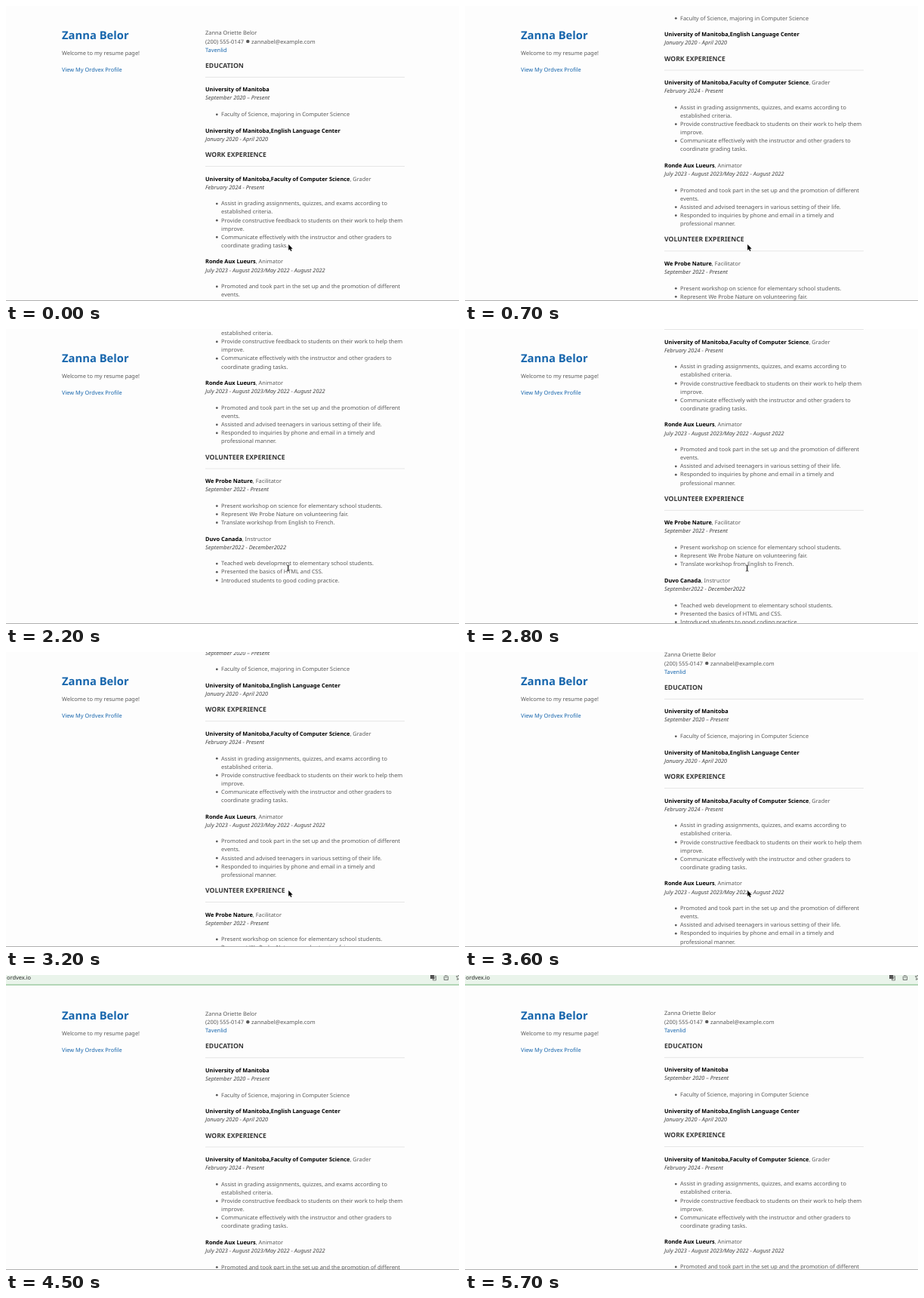
An HTML page with a canvas for the animation above (5800 ms loop, 600 by 391 pixels).

```html
<!DOCTYPE html>
<html lang="en">
<head>
<meta charset="utf-8">
<title>Resume page</title>
<style>
  html, body { margin: 0; width: 100%; height: 100%; overflow: hidden; background: #fdfdfd; }
  canvas { display: block; width: 600px; height: 391px; }
</style>
</head>
<body>
<canvas id="stage"></canvas>
<script>
const W = 600, H = 391, LOOP = 5800, STEP = 100;
const ZOOM = 0.528, TOP = 30, LEFT = 74, RIGHT = 264;
const FAMILY = '"Noto Sans", "Open Sans", sans-serif';
const BODY = '#595959', STRONG = '#000', DATE = '#444', HEAD = '#363636', LINK = '#1766ad';

const canvas = document.getElementById('stage');
const ctx = canvas.getContext('2d');
const dpr = window.devicePixelRatio || 1;
canvas.width = Math.round(W * dpr);
canvas.height = Math.round(H * dpr);

const resume = [
  ['contact'],
  ['heading', 'EDUCATION'],
  ['entry', 'University of Manitoba', '', 'September 2020 – Present'],
  ['list', ['Faculty of Science, majoring in Computer Science']],
  ['entry', 'University of Manitoba,English Language Center', '', 'January 2020 - April 2020'],
  ['heading', 'WORK EXPERIENCE'],
  ['entry', 'University of Manitoba,Faculty of Computer Science', ', Grader', 'February 2024 - Present'],
  ['list', [
    'Assist in grading assignments, quizzes, and exams according to\nestablished criteria.',
    'Provide constructive feedback to students on their work to help them\nimprove.',
    'Communicate effectively with the instructor and other graders to\ncoordinate grading tasks.']],
  ['entry', 'Ronde Aux Lueurs', ', Animator', 'July 2023 - August 2023/May 2022 - August 2022'],
  ['list', [
    'Promoted and took part in the set up and the promotion of different\nevents.',
    'Assisted and advised teenagers in various setting of their life.',
    'Responded to inquiries by phone and email in a timely and\nprofessional manner.']],
  ['heading', 'VOLUNTEER EXPERIENCE'],
  ['entry', 'We Probe Nature', ', Facilitator', 'September 2022 - Present'],
  ['list', [
    'Present workshop on science for elementary school students.',
    'Represent We Probe Nature on volunteering fair.',
    'Translate workshop from English to French.']],
  ['entry', 'Duvo Canada', ', Instructor', 'September2022 - December2022'],
  ['list', [
    'Teached web development to elementary school students.',
    'Presented the basics of HTML and CSS.',
    'Introduced students to good coding practice.']]
];

// Scroll offset of the page: [time, pixels]
const scrollKeys = [
  [0, 0], [700, 127.5], [1500, 223.5], [2150, 268], [2800, 212],
  [3600, 32], [4200, 0], [4500, -0.4], [4700, 0]
];

function slope(i) {
  const a = scrollKeys[i - 1], b = scrollKeys[i + 1];
  if (!a || !b || i > 5) return 0;
  return (b[1] - a[1]) / (b[0] - a[0]);
}

function scrollAt(t) {
  const i = scrollKeys.findIndex(k => k[0] > t) - 1;
  if (i < 0) return scrollKeys[scrollKeys.length - 1][1];
  const [t0, p0] = scrollKeys[i], [t1, p1] = scrollKeys[i + 1];
  const d = t1 - t0, u = (t - t0) / d, v = 1 - u;
  return p0 * v * v * (1 + 2 * u) + p1 * u * u * (3 - 2 * u)
    + d * u * v * (slope(i) * v - slope(i + 1) * u);
}

function barShift(t) {
  const u = Math.min(1, Math.max(0, (t - 4200) / 300));
  return 15 * u * u * (3 - 2 * u);
}

// Draws text centred on its line and returns the x where it ends
function write(text, x, mid, color = BODY, style = '', size = 14) {
  ctx.font = `${style} ${size}px ${FAMILY}`;
  ctx.fillStyle = color;
  ctx.fillText(text, x, mid + size * 0.388);
  return x + ctx.measureText(text).width;
}

function dot(x, y, r, color = BODY) {
  ctx.fillStyle = color;
  ctx.beginPath();
  ctx.arc(x, y, r, 0, Math.PI * 2);
  ctx.fill();
}

const blocks = {
  contact(y) {
    write('Zanna Oriette Belor', 0, y + 10.5);
    const end = write('(200) 555-0147', 0, y + 31.5);
    dot(end + 10, y + 32, 4.2);
    write('zannabel@example.com', end + 19, y + 31.5);
    write('Tavenlid', 0, y + 52.5, LINK);
    return 83;
  },
  heading(y, text) {
    write(text, 0, y + 9, HEAD, 'bold', 16.38);
    ctx.fillStyle = '#e2e2e2';
    ctx.fillRect(0, y + 38, 500, 1.6);
    return 59;
  },
  entry(y, title, role, dates) {
    const end = write(title, 0, y + 10.5, STRONG, 'bold');
    write(role, end, y + 10.5);
    write(dates, 0, y + 31.5, DATE, 'italic');
    return 62;
  },
  list(y, items) {
    let line = y + 10.5;
    for (const item of items) {
      dot(29, line + 1, 2.6);
      for (const part of item.split('\n')) {
        write(part, 40, line);
        line += 21;
      }
    }
    return line - 10.5 - y + 20;
  }
};

function inPage(x, y, draw) {
  ctx.save();
  ctx.translate(x, y);
  ctx.scale(ZOOM, ZOOM);
  draw();
  ctx.restore();
}

function drawProfile() {
  write('Zanna Belor', 0, 15.4, LINK, 'bold', 28);
  write('Welcome to my resume page!', 0, 61.3);
  write('View My Ordvex Profile', 0, 102.3, LINK);
}

function drawResume() {
  let y = 0;
  for (const [kind, ...args] of resume) y += blocks[kind](y, ...args);
}

function stroke(path, color, width) {
  ctx.strokeStyle = color;
  ctx.lineWidth = width;
  ctx.stroke(new Path2D(path));
}

function drawBar(shift) {
  if (shift <= 0) return;
  ctx.save();
  ctx.translate(0, shift - 15);
  ctx.fillStyle = '#eaf4eb';
  ctx.fillRect(0, -2, W, 14);
  ctx.fillStyle = '#b3d6b7';
  ctx.fillRect(0, 12, W, 2);
  write('ordvex.io', 1, 3, '#2b2b2b', '', 7.4);
  // translate, share and bookmark icons
  ctx.fillStyle = '#555';
  ctx.fillRect(562, -1, 5, 6);
  stroke('M565.5 1.5H569.5V7H565.5Z M566.5 3.5H568.7 M567.6 3V4.5L566.5 6', '#555', 0.7);
  stroke('M581.5 2H580.3V6.5H585.5V2H584.3 M582.9 4.5V-0.8 M581.3 0.8L582.9 -0.8L584.5 0.8', '#555', 0.8);
  stroke('M600 -1L598.9 1.7L596.2 1.9L598.2 3.7L597.6 6.4L600 5', '#555', 0.8);
  ctx.restore();
}

function drawCursor(t) {
  if (t >= 4300) return;
  ctx.save();
  if (t >= 1400 && t < 3000) {
    ctx.translate(373.7, 317);
    const beam = 'M-1.8 -4Q0 -4 0 -3V3Q0 4 -1.8 4 M1.8 -4Q0 -4 0 -3V3Q0 4 1.8 4';
    stroke(beam, '#fff', 1.8);
    stroke(beam, '#222', 0.9);
  } else {
    ctx.translate(374.2, 316);
    const arrow = 'M0 0V7.8L1.8 6.2L3 9L4.3 8.4L3.1 5.7H5.5Z';
    stroke(arrow, '#fff', 1.3);
    ctx.fillStyle = '#000';
    ctx.fill(new Path2D(arrow));
  }
  ctx.restore();
}

function render(t) {
  const shift = barShift(t);
  ctx.setTransform(dpr, 0, 0, dpr, 0, 0);
  ctx.textBaseline = 'alphabetic';
  ctx.textRendering = 'geometricPrecision';
  ctx.fillStyle = '#fdfdfd';
  ctx.fillRect(0, 0, W, H);
  inPage(LEFT, TOP + shift, drawProfile);
  inPage(RIGHT, TOP + shift - scrollAt(t), drawResume);
  drawBar(shift);
  ctx.fillStyle = '#b0b0b0';
  ctx.fillRect(0, H - 1, W, 1);
  drawCursor(t);
}

const start = performance.now();
function tick() {
  const t = (performance.now() - start) % LOOP;
  render(Math.floor(t / STEP) * STEP);
  requestAnimationFrame(tick);
}
tick();
</script>
</body>
</html>
```
